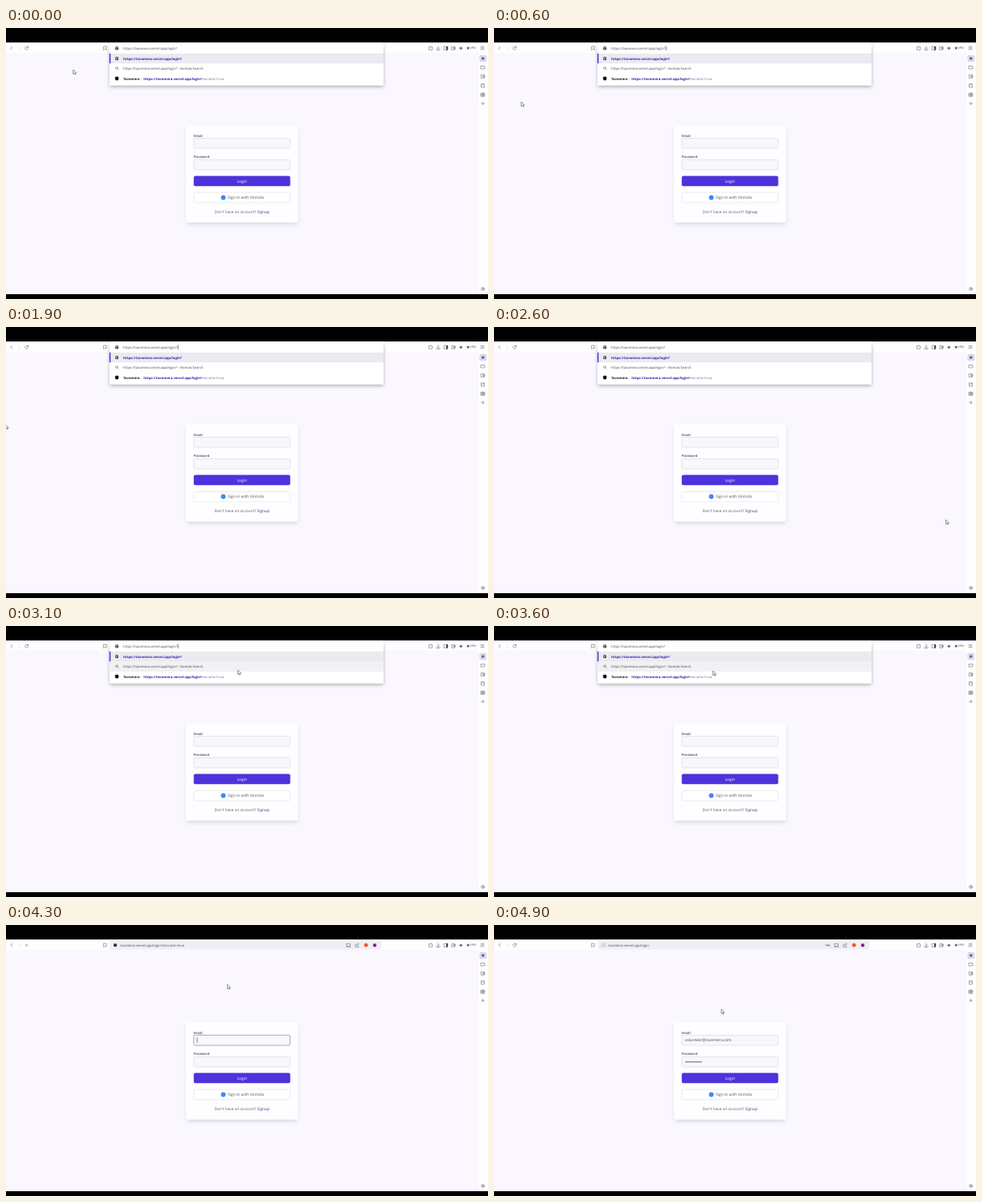
Recreate the animation shown at these times as an HTML page. Size 600 px wide and 338 px high, loop 5 s.

```html
<!DOCTYPE html>
<html lang="en">
<head>
<meta charset="utf-8">
<title>Login page</title>
<style>
  html, body { margin: 0; width: 100%; height: 100%; overflow: hidden; background: #000; }
  svg { display: block; width: 100%; height: 100%; }
  text { font-family: "Open Sans", "Noto Sans", sans-serif; font-size: 4.2px; fill: #45454d;
         text-rendering: geometricPrecision; white-space: pre; }
  .semi { font-weight: 600; }
  .bold { font-weight: 700; }
  .link { fill: #3720ad; }
  .mid { font-size: 4.95px; text-anchor: middle; }
  .icon { fill: none; stroke: #6c6c75; stroke-width: .6; stroke-linecap: round; stroke-linejoin: round; }
  .field { fill: #f8f7fb; stroke: #d6d4dd; stroke-width: .6; }
</style>
</head>
<body>
<svg viewBox="0 0 600 338">
  <defs>
    <filter id="soft" x="-20%" y="-20%" width="140%" height="150%">
      <feGaussianBlur stdDeviation="2.4"/>
    </filter>
    <g id="globe">
      <circle r="2.2" fill="#44444c"/>
      <path d="M-1.6-.8 0-.3-.5 1.2M.6-1.7 1.6-.2" fill="none" stroke="#fff" stroke-width=".6"/>
    </g>
    <clipPath id="below"><rect x="110" y="31" width="380" height="60"/></clipPath>
  </defs>

  <rect width="600" height="338"/>
  <rect y="18" width="600" height="314" fill="#faf8fe"/>
  <rect y="18" width="600" height="13" fill="#fefeff"/>
  <rect y="18" width="600" height=".8" fill="#eeeaf6"/>
  <rect x="588" y="31" width="12" height="301" fill="#fefeff"/>
  <path d="M588 31V332" stroke="#f1eff6" stroke-width=".5"/>

  <!-- toolbar -->
  <g class="icon">
    <path d="M7.6 23.2 5.8 25.1 7.6 27"/>
    <path d="M15.6 23.2 17.4 25.1 15.6 27" stroke="#d0d0d6"/>
    <path id="reload" d="M27.5 24.2A2 2 0 1 0 27.6 25.9M27.8 22.8V24.3H26.3"/>
    <path id="stop" d="M24.4 23.9 26.8 26.3M26.8 23.9 24.4 26.3"/>
    <path d="M121.7 23H125V27.3L123.35 26.1 121.7 27.3Z"/>
    <path d="M526.8 23.6H528V23H529.3V23.6H530.5V27.3H526.8Z"/>
    <path d="M538 22.8V26M536.8 24.9 538 26.1 539.2 24.9M536 26.5V27.5H540V26.5"/>
    <rect x="545.5" y="23.1" width="4.4" height="4.2"/>
    <path d="M555.1 23.3H558.7V27.2H555.1ZM557.3 24.6H559.4V26H557.3Z"/>
    <path d="M591.1 23.5H594.9M591.1 25.1H594.9M591.1 26.7H594.9"/>
  </g>
  <rect x="547.9" y="23" width="2.1" height="4.4" fill="#44444c"/>
  <circle cx="566.3" cy="25.2" r="1.8" fill="#7b7b85"/>
  <circle cx="575.1" cy="25.1" r="1.5" fill="#5c5c66"/>
  <text x="577.6" y="26.4" style="font-size:3.7px">VPN</text>

  <!-- side strip -->
  <rect x="589.4" y="33.8" width="8.6" height="8.5" rx="1.5" fill="#d9d7ee"/>
  <circle cx="593.7" cy="38" r="1.8" fill="#68668a"/>
  <g class="icon">
    <rect x="591.4" y="47.5" width="4.4" height="3.4"/>
    <path d="M591.6 58.6H595.5V62.3H591.6ZM594 59.8H595.9V61.2H594Z"/>
    <path d="M591.8 69.7H595.4V73.9H591.8ZM592.7 71.1H594.5"/>
    <path d="M591.5 81.2H595.7V85.2H591.5ZM591.5 82.6H595.7M591.5 84H595.7M593.6 81.2V85.2"/>
    <path d="M593.6 92.5V95.9M591.9 94.2H595.3"/>
    <circle cx="593.6" cy="325.4" r="2"/>
    <circle cx="593.6" cy="325.4" r=".6"/>
  </g>

  <!-- address bar -->
  <g id="address">
    <rect x="129.5" y="20" width="338" height="10.4" rx="2" fill="#f0eef5"/>
    <circle id="siteDot" cx="136" cy="25.2" r="2.1" fill="#303036"/>
    <path id="tune" class="icon" d="M134 23.9H135.4M137 23.9H138.2M134 26.4H135M136.6 26.4H138.2"/>
    <text id="url" x="142" y="26.6"></text>
    <g class="icon">
      <g id="key"><circle cx="414.3" cy="25.2" r="1.2"/><path d="M415.5 25.2H418.2V26.3M416.9 25.2V26.2"/></g>
      <path d="M424.2 23.4H428.6V26.4H424.2ZM423.9 27.3H428.9"/>
      <path d="M436 24.2H435V27.4H438.8V26M436.6 25.6C436.7 24 437.6 23.6 439 23.6M438 22.6 439 23.6 438 24.6"/>
    </g>
    <circle cx="448.2" cy="25.2" r="2.4" fill="#f0582c"/>
    <circle cx="459" cy="25.2" r="2.2" fill="#7d2a83"/>
  </g>

  <!-- card -->
  <rect x="225" y="125" width="138" height="120" rx="2" fill="#1d1740" opacity=".15" filter="url(#soft)"/>
  <rect x="224" y="121.5" width="139.7" height="121.3" rx="2" fill="#fefdff"/>
  <text class="semi" x="233.6" y="135.5">Email</text>
  <rect id="email" class="field" x="233.7" y="137.4" width="120" height="12.7" rx="2"/>
  <path id="emailCaret" d="M238 140.3V147" stroke="#33333a" stroke-width=".6"/>
  <text class="semi" x="233.6" y="162.4">Password</text>
  <rect class="field" x="233.7" y="164.3" width="120" height="12.7" rx="2"/>
  <g id="filled">
    <text x="237.5" y="145.4" style="font-size:4.8px">volunteer@tavomera.com</text>
    <g id="bullets" fill="#3c3c44"></g>
  </g>
  <rect x="233.7" y="184.6" width="120.1" height="12.6" rx="2" fill="#4c33dc"/>
  <text class="mid" x="293.7" y="192.8" style="fill:#fff;font-weight:500">Login</text>
  <rect x="233.7" y="205.2" width="120" height="12.6" rx="2" fill="#fff" stroke="#dfdee5" stroke-width=".6"/>
  <circle cx="270.5" cy="211.5" r="2.9" fill="#4285f4"/>
  <text x="276" y="213.3" style="font-size:4.95px;fill:#55555d">Sign in with Vomola</text>
  <text class="mid" x="293.7" y="231.1" style="font-size:4.8px;fill:#5e5e66">Don't have an account? <tspan fill="#40358f">Signup</tspan></text>

  <!-- suggestions -->
  <g id="list">
    <rect x="129.5" y="22" width="340" height="51" fill="#000" opacity=".35" filter="url(#soft)"/>
    <rect x="128.7" y="18" width="341.3" height="53.8" rx="1" fill="#fff"/>
    <rect id="row1" x="128.7" y="31.8" width="341.3" height="12.4" fill="#ebeaf0"/>
    <rect id="row2" x="128.7" y="44.2" width="341.3" height="12.6" fill="#f1f1f3"/>
    <rect id="row3" x="128.7" y="56.8" width="341.3" height="12.6" fill="#ebeaf0"/>
    <rect id="mark" x="128.7" width="1.5" height="12.4" fill="#4c33dc"/>
    <use href="#globe" x="138" y="25.2"/>
    <text x="146" y="26.6">https://tavomera.vercel.app/login?</text>
    <path id="caret" d="M214.2 22.3V28" stroke="#222" stroke-width=".6"/>
    <use href="#globe" x="138" y="38"/>
    <text class="bold link" x="146" y="39.5">https://tavomera.vercel.app/login?</text>
    <g class="icon"><circle cx="137.7" cy="50" r="1.3"/><path d="M138.7 51 139.8 52.1"/></g>
    <text x="146" y="52">https://tavomera.vercel.app/login? - Vomola Search</text>
    <circle cx="138" cy="63" r="2.4" fill="#101014"/>
    <text class="bold" x="146" y="64.5" style="fill:#1c1c22">Tavomera</text>
    <text x="168" y="64.5">-</text>
    <text x="171.2" y="64.5"><tspan class="bold link">https://tavomera.vercel.app/login?</tspan><tspan fill="#726fa0">recruiter=true</tspan></text>
    <path id="remove" class="icon" d="M460 61.9 462.4 64.3M462.4 61.9 460 64.3"/>
  </g>

  <path id="pointer" d="M0 0V5.5L1.3 4.3 2.2 6.2 3.1 5.8 2.2 4H4Z" fill="#fff" stroke="#3c3c44" stroke-width=".55" stroke-linejoin="round"/>
</svg>
<script>
const LOOP = 5000, CLICK = 3900, GONE = 4100, LOADED = 4500, BLINK = 1060;
const $ = id => document.getElementById(id);
const show = (id, on) => $(id).setAttribute("visibility", on ? "inherit" : "hidden");

// time, x, y of the pointer tip
const path = [
  [0, 83.6, 52], [100, 81, 54], [600, 34, 92], [1000, 2, 115], [1100, -1, 116],
  [1900, -1, 121.5], [2000, 18, 124], [2200, 300, 180], [2400, 564, 222],
  [2600, 562.6, 240.5], [2700, 545, 228], [2850, 410, 136], [3000, 298, 55],
  [3150, 284, 55], [3600, 272.6, 56], [3700, 272.6, 56], [3850, 272.6, 61.6],
  [4100, 272.6, 61.6], [4800, 283, 105], [5000, 283, 105]
];

function pointerAt(t) {
  const i = path.findIndex(p => p[0] > t);
  const a = path[i - 1], b = path[i];
  const k = (t - a[0]) / (b[0] - a[0]);
  return [a[1] + (b[1] - a[1]) * k, a[2] + (b[2] - a[2]) * k];
}

for (let i = 0; i < 10; i++) {
  const dot = document.createElementNS("http://www.w3.org/2000/svg", "circle");
  dot.setAttribute("cx", 238.8 + i * 2.08);
  dot.setAttribute("cy", 170.8);
  dot.setAttribute("r", .78);
  $("bullets").append(dot);
}

function draw(t) {
  const [x, y] = pointerAt(t);
  const clicked = t >= CLICK, loaded = t >= LOADED;
  const over = x > 129 && x < 470;
  $("pointer").setAttribute("transform", `translate(${x} ${y})`);

  show("list", t < GONE);
  $("list").setAttribute("opacity", clicked ? Math.max(0, (GONE - t) / (GONE - CLICK)) : 1);
  if (clicked) $("list").setAttribute("clip-path", "url(#below)");
  else $("list").removeAttribute("clip-path");
  show("row1", !clicked);
  show("row2", over && y >= 44.2 && y < 56.8);
  show("row3", clicked || over && y >= 56.8 && y < 69.4);
  $("mark").setAttribute("y", clicked ? 56.9 : 31.8);
  show("remove", clicked);
  const phase = t % BLINK;
  show("caret", !clicked && phase >= 500 && phase < 1030);

  show("address", clicked);
  $("url").textContent = "tavomera.vercel.app/login" + (loaded ? "" : "?recruiter=true");
  show("siteDot", !loaded);
  show("tune", loaded);
  show("key", loaded);
  show("reload", !clicked || loaded);
  show("stop", clicked && !loaded);

  const focused = clicked && !loaded;
  $("email").style.stroke = focused ? "#77728f" : "#d6d4dd";
  show("emailCaret", focused && t < CLICK + 530);
  show("filled", loaded);
}

const start = performance.now();
function tick() {
  draw((performance.now() - start) % LOOP);
  requestAnimationFrame(tick);
}
tick();
</script>
</body>
</html>
```
